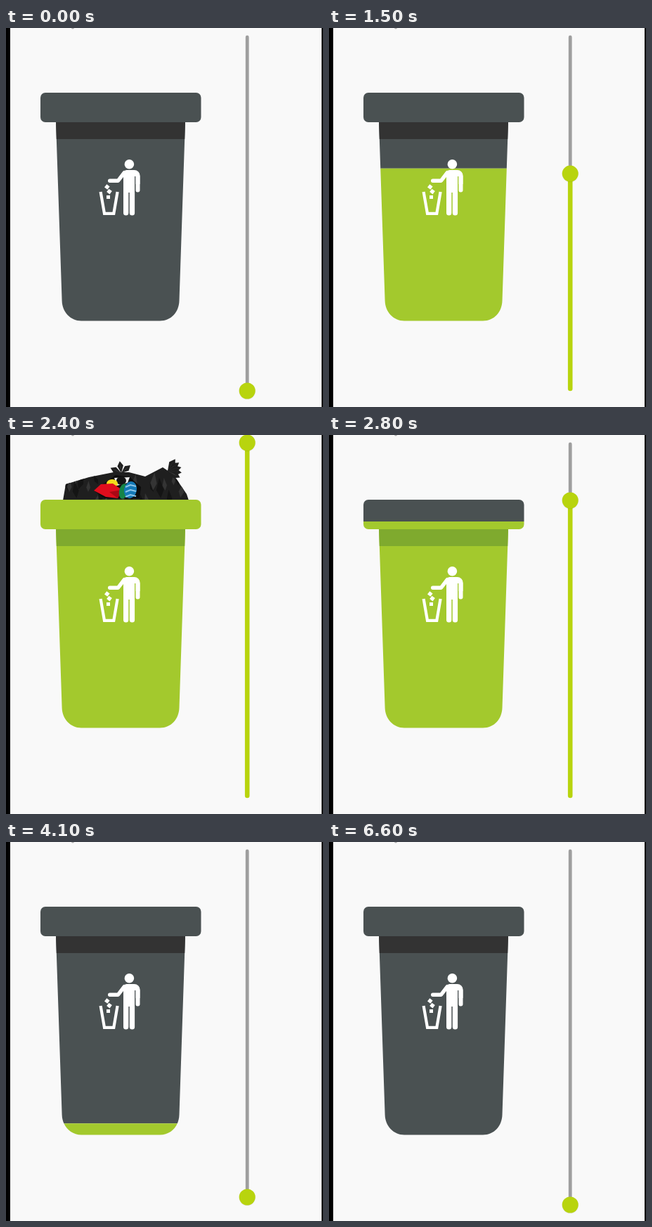
An HTML page with a canvas that plays this animation: 451x539 px, repeating every 6700 ms.

```html
<!DOCTYPE html>
<html lang="en">
<head>
<meta charset="utf-8">
<title>Bin level slider</title>
<style>
  html, body { margin: 0; width: 100%; height: 100%; overflow: hidden; background: #000; }
  canvas { display: block; }
</style>
</head>
<body>
<canvas id="stage" width="451" height="539"></canvas>
<script>
const ctx = document.getElementById('stage').getContext('2d');
const LOOP = 6700, STEP = 100;
const TRACK_X = 343.2, TRACK_TOP = 13, TRACK_END = 513, REST_Y = 516, KNOB_R = 11.5;
const LIME = '#b8d40e', BAG = '#1f1f1f';
const GREY_BIN = { main: '#4a5152', band: '#333333' };
const GREEN_BIN = { main: '#a3c92d', band: '#7faa2e' };

// Turning points of the drag, joined by a smooth spline
const DRAG = [[600, REST_Y], [1000, 370], [1300, 279], [1900, 73], [2400, 11],
  [2800, 93], [3500, 421], [4100, 505], [4300, REST_Y]];

function slope(i) {
  const before = DRAG[i - 1], after = DRAG[i + 1];
  if (!before || !after) return 0;
  const turns = (DRAG[i][1] - before[1]) * (after[1] - DRAG[i][1]) < 0;
  return turns ? 0 : (after[1] - before[1]) / (after[0] - before[0]);
}

function knobAt(t) {
  const i = DRAG.findIndex(key => key[0] > t);
  if (i < 1) return REST_Y;
  const [t0, y0] = DRAG[i - 1], [t1, y1] = DRAG[i];
  const span = t1 - t0, u = (t - t0) / span, v = 1 - u;
  return y0 + (y1 - y0) * u * u * (3 - 2 * u)
    + span * u * v * (v * slope(i - 1) - u * slope(i));
}

function random(seed) {
  return () => (seed = seed * 16807 % 2147483647) / 2147483647;
}

function path(points) {
  ctx.beginPath();
  points.forEach(([x, y]) => ctx.lineTo(x, y));
}

function shape(color, ...points) {
  ctx.fillStyle = color;
  path(points);
  ctx.fill();
}

function disc(color, x, y, rx, ry = rx, turn = 0) {
  ctx.fillStyle = color;
  ctx.beginPath();
  ctx.ellipse(x, y, rx, ry, turn, 0, Math.PI * 2);
  ctx.fill();
}

function box(color, x, y, w, h, r = 0) {
  ctx.fillStyle = color;
  ctx.beginPath();
  ctx.roundRect(x, y, w, h, r);
  ctx.fill();
}

function line(color, width, cap, ...points) {
  ctx.strokeStyle = color;
  ctx.lineWidth = width;
  ctx.lineCap = cap;
  ctx.lineJoin = cap === 'round' ? 'round' : 'miter';
  path(points);
  ctx.stroke();
}

function drawBin(colors, top, bottom) {
  ctx.save();
  ctx.beginPath();
  ctx.rect(0, top, 300, bottom - top);
  ctx.clip();
  ctx.fillStyle = colors.main;
  ctx.beginPath();
  ctx.moveTo(71, 134);
  ctx.lineTo(79.6, 388);
  ctx.bezierCurveTo(80, 404, 92, 416.5, 107, 416.5);
  ctx.lineTo(219, 416.5);
  ctx.bezierCurveTo(235, 416.5, 246, 404, 246.5, 388);
  ctx.lineTo(255, 134);
  ctx.fill();
  shape(colors.band, [71, 133], [255, 133], [254.2, 158], [71.8, 158]);
  box(colors.main, 49, 92, 228.5, 42, 7);
  ctx.restore();
}

function diamond(x, y, r = 3.8) {
  shape('#fff', [x - r, y + 0.5], [x - 0.5, y - r], [x + r, y - 0.5], [x + 0.5, y + r]);
}

function drawPictogram(gap) {
  disc('#fff', 175.4, 193.7, 6.8);
  box('#fff', 167, 202, 23.5, 20, [5, 8, 0, 0]);
  box('#fff', 167, 210, 16, 24);
  box('#fff', 184.3, 208, 6.2, 25.5, 3);
  for (const x of [167, 175.8]) box('#fff', x, 225, 7.3, 41.5, 3.5);
  box(gap, 183, 211, 1.3, 23);
  line('#fff', 5.4, 'round', [168.5, 205.5], [159.5, 217.2], [147.7, 217.2]);
  line('#fff', 4.2, 'butt', [134.6, 233], [140, 263.8], [153.3, 263.8], [158.6, 233]);
  diamond(143.8, 226);
  diamond(147, 232.6);
  box('#fff', 143, 238, 5, 5);
}

// Pointed scrap of plastic running from (x, y) to (x + dx, y + dy)
function leaf(color, x, y, dx, dy, width) {
  const bulge = side => [x + dx * 0.6 - dy * width * side, y + dy * 0.6 + dx * width * side];
  shape(color, [x, y], bulge(1), [x + dx, y + dy], bulge(-1));
}

function knot(x, y, start, end, count, length) {
  for (let i = 0; i < count; i++) {
    const angle = start + (end - start) * i / (count - 1);
    const dx = Math.cos(angle) * length, dy = Math.sin(angle) * length;
    leaf(BAG, x, y, dx, dy, 0.25);
    leaf('#343434', x, y, dx * 0.8, dy * 0.8, 0.05);
  }
}

function drawFolds() {
  const rand = random(29);
  for (let i = 0; i < 26; i++) {
    const x = 84 + i * 6.7, y = 52 + rand() * 36;
    leaf(i % 2 ? '#343434' : '#141414', x, y, rand() * 16 - 8, 12 + rand() * 18, 0.18);
  }
}

function drawRubbish() {
  shape('#0c0c0c', [125, 79], [156, 57], [176, 60], [192, 74], [190, 90], [140, 90]);
  shape('#eee', [154, 61], [176, 60], [173, 68], [158, 72]);
  disc('#151515', 164, 65, 7, 6);
  disc('#f3db1c', 151, 69, 8, 6);
  shape('#df0d1d', [125, 79], [135, 70], [152, 69], [165, 78], [159, 90], [142, 88]);
  shape('#a90815', [147, 81], [165, 78], [159, 90]);
  disc('#168447', 167, 80, 6, 11, 0.2);
  disc('#1479b7', 177, 78, 9, 12, 0.2);
  for (const y of [73, 80, 87]) line('#8ec6e8', 2, 'butt', [170, y + 1], [177, y - 2], [185, y]);
}

function drawBags() {
  ctx.save();
  shape(BAG, [81, 93], [85, 70], [118, 60], [153, 53], [175, 53], [198, 59],
    [223, 46], [238, 56], [257, 84], [260, 93]);
  ctx.clip();
  drawFolds();
  drawRubbish();
  ctx.restore();
  knot(164, 54, -2.7, -0.7, 3, 17);
  knot(230, 51, -1, 0.5, 5, 20);
}

function drawSlider(y, pressed) {
  line('#9e9e9e', 4.8, 'round', [TRACK_X, TRACK_TOP], [TRACK_X, TRACK_END]);
  if (pressed) disc('rgba(184,212,14,0.14)', TRACK_X, y, 27);
  if (y < TRACK_END) line(LIME, 6.6, 'round', [TRACK_X, y], [TRACK_X, TRACK_END]);
  ctx.save();
  ctx.shadowColor = pressed ? 'rgba(0,0,0,0.32)' : 'rgba(0,0,0,0.12)';
  ctx.shadowBlur = pressed ? 9 : 1;
  ctx.shadowOffsetY = pressed ? 5 : 0.5;
  disc(LIME, TRACK_X, y, KNOB_R);
  ctx.restore();
}

function draw(t) {
  const y = knobAt(t);
  const full = y < 83;
  const empty = y >= REST_Y;
  const level = full ? 92 : empty ? 417 : 309.5 + (y - 370) * 0.673;

  box('#000', 0, 0, 451, 539);
  box('#f9f9f9', 6, 0, 443, 539);
  disc('#aaa', 95, -0.8, 2.2);

  if (full) drawBags();
  drawBin(GREY_BIN, 90, level);
  drawBin(GREEN_BIN, level, 418);
  drawPictogram(level < 220 ? GREEN_BIN.main : GREY_BIN.main);
  drawSlider(y, t >= 700 && t < 1300);
}

function tick() {
  const t = performance.now() % LOOP;
  draw(Math.floor(t / STEP) * STEP);
  requestAnimationFrame(tick);
}
tick();
</script>
</body>
</html>
```
